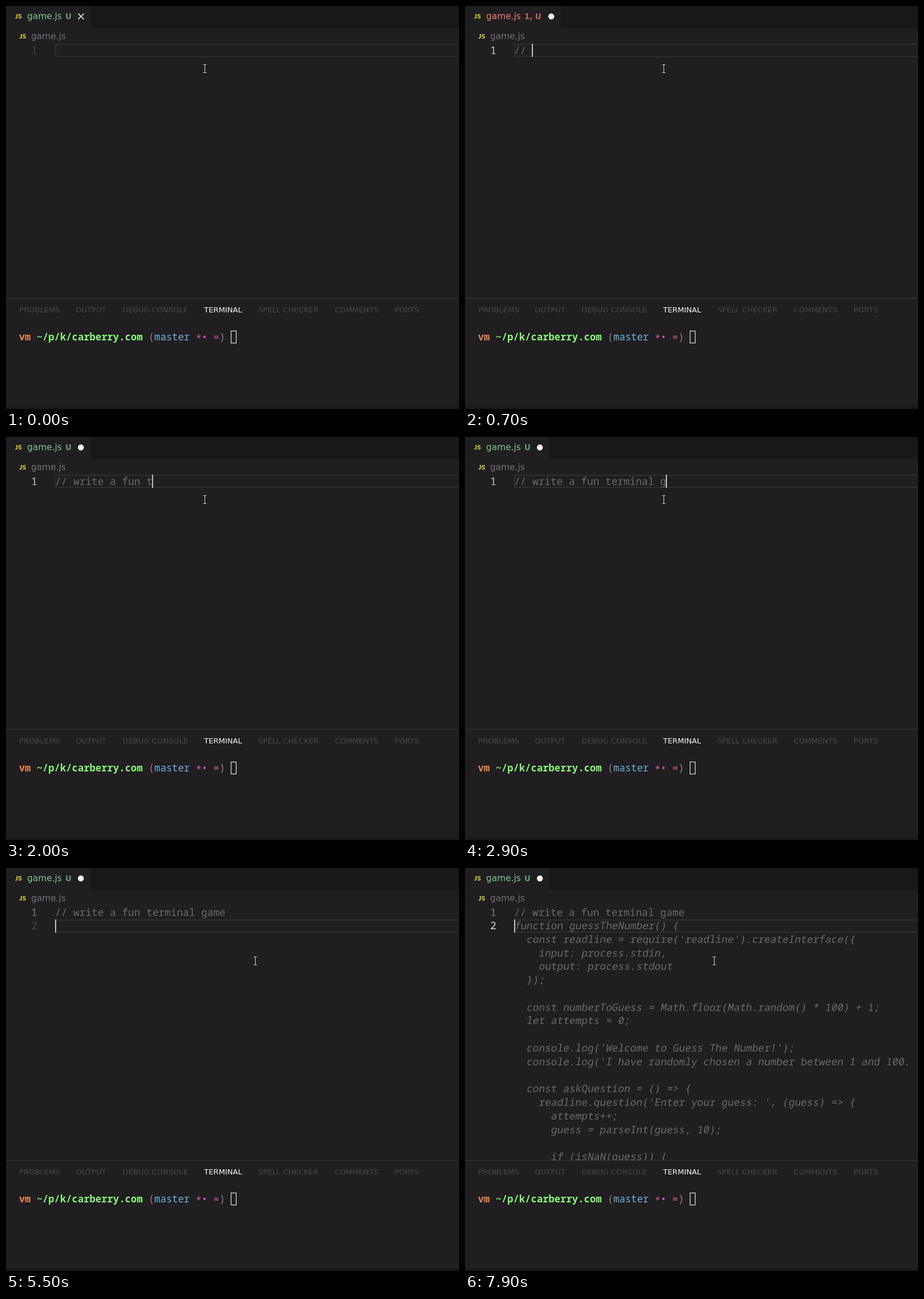
Animation, 794 px wide and 705 px high, one loop 8000 ms. Source, as an HTML page:

```html
<!DOCTYPE html>
<html lang="en">
<head>
<meta charset="utf-8">
<title>Editor typing</title>
<style>
  html, body { margin: 0; width: 100%; height: 100%; overflow: hidden; background: #201e20; }
  svg { display: block; width: 794px; height: 705px; }
  text { white-space: pre; }
  .ui { font-family: "DejaVu Sans", sans-serif; font-size: 15.4px; }
  .badge { font-size: 13.4px; font-weight: bold; }
  .panel { font-size: 13.1px; fill: #474548; }
  .icon { font-family: Lato, sans-serif; font-weight: 900; font-size: 11.8px; fill: #c9ca3e; }
  .code { font-family: "Noto Sans Mono", "DejaVu Sans Mono", monospace; font-size: 17.8px; fill: #6b696c; }
  .term { font-size: 17.22px; }
  .num { text-anchor: middle; }
  .bold { font-weight: 600; }
</style>
</head>
<body>
<svg viewBox="0 0 794 705">
  <rect width="794" height="705" fill="#201e20"/>
  <rect id="tabBar" x="148" width="646" height="39" fill="#19171a"/>
  <text class="icon" x="16" y="22">JS</text>
  <text class="ui" id="tabName" x="37" y="23">game.js</text>
  <text class="ui badge" id="badge" x="104" y="22.5">U</text>
  <path id="close" d="M126.5 13.2l10 10m0-10l-10 10" stroke="#f4f4f2" stroke-width="1.6"/>
  <circle id="dot" cx="131.2" cy="18.2" r="5.2" fill="#f4f4f2"/>
  <text class="icon" x="23.5" y="57">JS</text>
  <text class="ui" x="44" y="58" fill="#727072">game.js</text>

  <rect id="line" x="87" width="720" height="21" fill="none" stroke="#2f2d30" stroke-width="2"/>
  <text class="code num" id="num1" x="49.7" y="83.5">1</text>
  <text class="code num" id="num2" x="49.7" y="107.3">2</text>
  <text class="code" id="typed" x="86" y="83.5"></text>
  <clipPath id="editor"><rect width="794" height="511"/></clipPath>
  <g clip-path="url(#editor)"><g id="ghost"></g></g>
  <rect id="caret" width="2" height="23" fill="#c4c3c4"/>

  <rect y="511" width="794" height="1" fill="#3b393c"/>
  <g id="titles"></g>
  <text class="code term" x="22.7" y="584.7"><tspan
    class="bold" fill="#e38450">vm </tspan><tspan
    class="bold" fill="#8af57c">~/p/k/carberry.com </tspan><tspan
    fill="#858386">(</tspan><tspan
    fill="#70b2de">master </tspan><tspan
    fill="#d0589f" dy="3.5">*</tspan><tspan
    fill="#c060c0" dy="-3.5">• </tspan><tspan
    fill="#d0589f">=</tspan><tspan
    fill="#858386">)</tspan></text>
  <rect x="394.5" y="568.5" width="9" height="21" fill="none" stroke="#e4e3e4" stroke-width="1.2"/>
  <rect y="701" width="794" height="4" fill="#19171a"/>

  <g id="mouse" fill="none">
    <path d="M-3-7H3M0-7V7M-3 7H3" stroke="#0c0b0c" stroke-width="3"/>
    <path d="M-3-7H3M0-7V7M-3 7H3" stroke="#dcdcdc" stroke-width="1.2"/>
  </g>
</svg>
<script>
const LOOP = 8000, STEP = 100;
const LEFT = 86, ADVANCE = 10.68, ROW = 23.78, BASE = 83.5;
const COMMENT = '// write a fun terminal game';
const NEWLINE = 3500, SUGGEST = 7900;

// [time, characters on the first line]
const KEYS = [
  [0, 0], [200, 1], [300, 2], [500, 3],
  ...Array.from({ length: 15 }, (_, i) => [800 + i * 100, 4 + i]),
  [2400, 20], [2500, 22], [2700, 24], [2900, 25], [3000, 26], [3100, 27], [3200, 28]
];

const SUGGESTION = `function guessTheNumber() {
  const readline = require('readline').createInterface({
    input: process.stdin,
    output: process.stdout
  });

  const numberToGuess = Math.floor(Math.random() * 100) + 1;
  let attempts = 0;

  console.log('Welcome to Guess The Number!');
  console.log('I have randomly chosen a number between 1 and 100.

  const askQuestion = () => {
    readline.question('Enter your guess: ', (guess) => {
      attempts++;
      guess = parseInt(guess, 10);

      if (isNaN(guess)) {`.split('\n');

const TITLES = [
  [23, 'PROBLEMS'], [122, 'OUTPUT'], [204, 'DEBUG CONSOLE'], [347, 'TERMINAL'],
  [442, 'SPELL CHECKER'], [576, 'COMMENTS'], [681, 'PORTS']
];

const $ = id => document.getElementById(id);
const set = (id, attrs) => {
  for (const key in attrs) $(id).setAttribute(key, attrs[key]);
};
const show = (id, on) => set(id, { visibility: on ? 'visible' : 'hidden' });
const paint = (id, color) => { $(id).style.fill = color; };

function addText(parent, text, className, attrs) {
  const el = document.createElementNS('http://www.w3.org/2000/svg', 'text');
  el.textContent = text;
  el.setAttribute('class', className);
  for (const key in attrs) el.setAttribute(key, attrs[key]);
  $(parent).append(el);
  return el;
}

SUGGESTION.forEach((line, i) => {
  const code = line.trimStart();
  const x = LEFT + (line.length - code.length) * ADVANCE;
  const y = BASE + (i + 1) * ROW - 0.3;
  addText('ghost', code, 'code', { transform: `translate(${x} ${y}) skewX(-9)` });
});

for (const [x, title] of TITLES) {
  const el = addText('titles', title, 'ui panel', { x: x + 0.3, y: 536.2 });
  if (title === 'TERMINAL') el.style.fill = '#f8f8f6';
}

function drawTab(t) {
  const edited = t >= 200, error = t >= 500 && t < 900;
  set('tabBar', { x: error ? 168 : 148 });
  paint('tabName', error ? '#ee7c70' : '#82c295');
  paint('badge', error ? '#be6558' : '#659a78');
  $('badge').textContent = error ? '1, U' : 'U';
  show('close', !edited);
  show('dot', edited);
  set('dot', { cx: error ? 151.2 : 131.2 });
}

function drawEditor(t) {
  const count = KEYS.findLast(key => key[0] <= t)[1];
  const second = t >= NEWLINE, suggest = t >= SUGGEST;
  const blink = Math.floor((t - NEWLINE) / 500) % 2 === 0;
  $('typed').textContent = COMMENT.slice(0, count);
  set('line', { y: second ? 91 : 67 });
  set('caret', {
    x: second ? LEFT : Math.max(LEFT, LEFT + count * ADVANCE - 1),
    y: second ? 90 : 66
  });
  show('caret', second ? blink : t >= 100);
  show('num2', second);
  show('ghost', suggest);
  paint('num1', second ? '#7e7c7f' : t >= 100 ? '#c8c7c8' : '#454346');
  paint('num2', suggest ? '#dddcdd' : '#454346');
}

function drawMouse(t) {
  const p = Math.min(1, Math.max(0, (t - 4390) / 610));
  const e = p * p * (3 - 2 * p);
  set('mouse', { transform: `translate(${348.5 + 88.5 * e} ${109.5 + 53 * e})` });
}

function frame(now) {
  const t = Math.floor((now % LOOP) / STEP) * STEP;
  drawTab(t);
  drawEditor(t);
  drawMouse(t);
  requestAnimationFrame(frame);
}
frame(performance.now());
</script>
</body>
</html>
```
